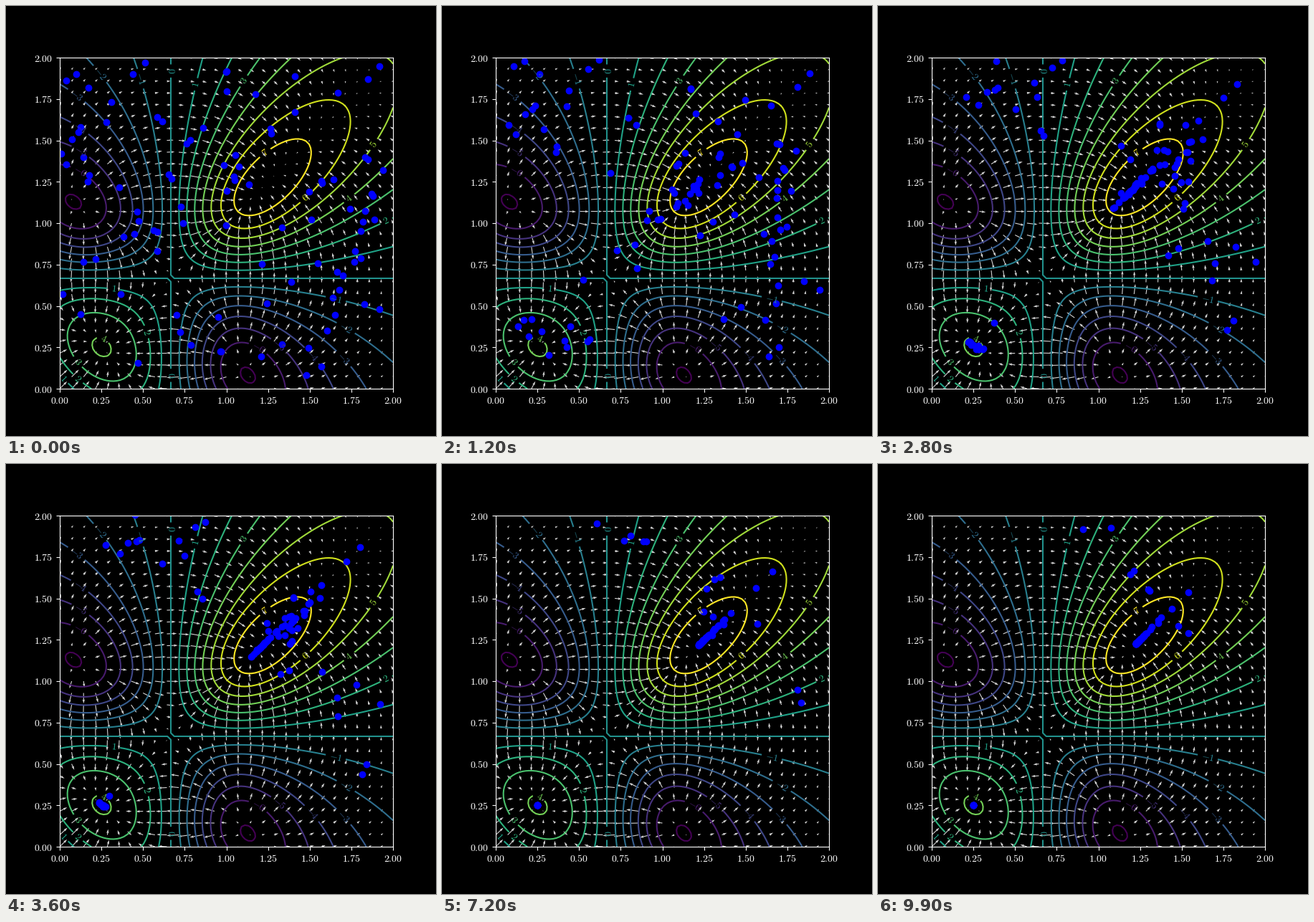
A matplotlib script for the animation above (10 s loop, 600 by 600 pixels).

```python
import numpy as np
import matplotlib.pyplot as plt
from matplotlib.animation import FuncAnimation

plt.style.use("dark_background")
plt.rcParams["mathtext.fontset"] = "cm"

FRAMES, INTERVAL = 100, 100
RATE = 0.002
DOTS = 99


def field(x, y):
    """Return the height and its gradient."""
    u, v, s = 3 * x - 2, 3 * y - 2, x + y
    p, q = 2 * x - 1, 2 * y - 1
    den = 2.3 + p**4 + q**4
    k = 12.7 / den
    z = k * s * u * v
    gx = k * (u * v + 3 * s * v) - 8 * p**3 * z / den
    gy = k * (u * v + 3 * s * u) - 8 * q**3 * z / den
    return z, gx, gy


def mesh(n):
    axis = np.linspace(0, 2, n)
    return np.meshgrid(axis, axis)


def start_points():
    """Dots that climb slowly are set by hand, the rest are scattered on steep ground."""
    slow = np.array([
        (0.04, 1.86), (0.10, 1.90), (0.17, 1.82), (0.31, 1.73), (0.01, 1.42),
        (0.11, 1.55), (0.44, 1.90), (0.51, 1.97), (1.92, 1.95), (1.85, 1.87),
        (1.67, 1.79), (1.92, 0.48), (1.83, 0.51), (1.21, 0.195),
    ])
    spots = np.random.default_rng(4).uniform(0, 2, (400, 2))
    _, gx, gy = field(*spots.T)
    steep = spots[np.hypot(gx, gy) > 7]
    return np.vstack([slow, steep[:DOTS - len(slow)]])


def climb(pos):
    """Follow the gradient uphill, one step per frame."""
    path = [pos]
    for _ in range(FRAMES - 1):
        _, gx, gy = field(*pos.T)
        pos = pos + RATE * np.column_stack([gx, gy])
        path.append(pos)
    return path


fig, ax = plt.subplots(figsize=(6, 6), dpi=100)
ax.set(xlim=(0, 2), ylim=(0, 2))
ticks = np.arange(0, 2.01, 0.25)
names = [f"${t:.2f}$" for t in ticks]
ax.set_xticks(ticks, names)
ax.set_yticks(ticks, names)

# Height lines
X, Y = mesh(100)
lines = ax.contour(X, Y, field(X, Y)[0], levels=np.arange(-7, 8),
                   cmap="viridis", linewidths=1.5, linestyles="solid")
ax.clabel(lines, inline=True, fontsize=10, fmt=lambda v: f"${v:.0f}$")

# Gradient arrows
GX, GY = mesh(29)
_, U, V = field(GX, GY)
ax.quiver(GX, GY, U, V, color="lightgray")

path = climb(start_points())
dots, = ax.plot([], [], "o", color="#0000ff", markersize=6)


def draw(i):
    dots.set_data(*path[i].T)
    return dots,


anim = FuncAnimation(fig, draw, frames=FRAMES, interval=INTERVAL,
                     repeat=True, repeat_delay=0)
plt.show()
```
